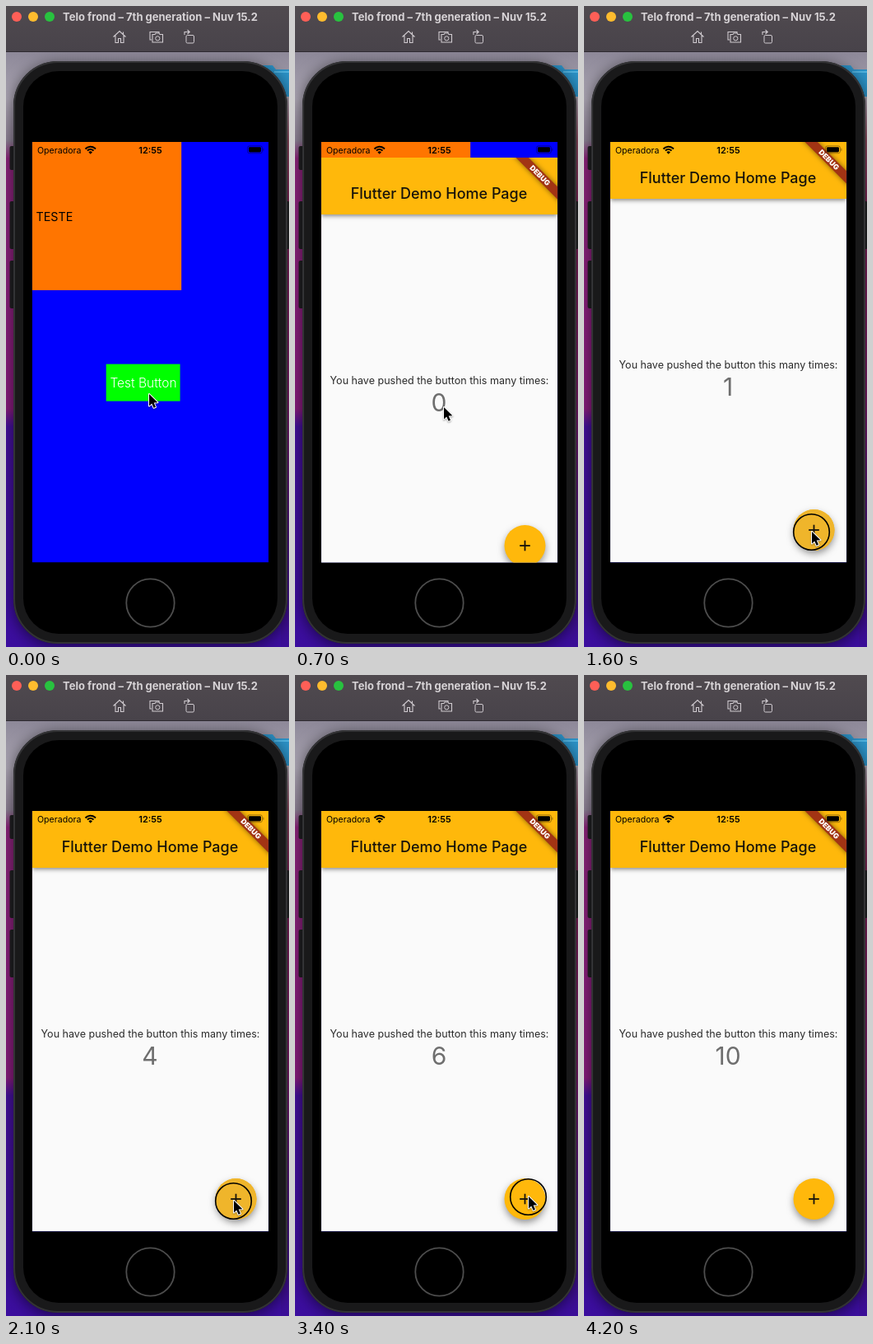
Recreate the animation shown at these times as an HTML page with a canvas. Size 344 by 778 pixels, loop 5.1 s.

```html
<!DOCTYPE html>
<html lang="en">
<head>
<meta charset="utf-8">
<title>Simulator demo</title>
<style>
html, body { margin: 0; width: 100%; height: 100%; overflow: hidden; background: #000; }
canvas { display: block; }
</style>
</head>
<body>
<canvas id="stage" width="344" height="778"></canvas>
<script>
const ctx = document.getElementById('stage').getContext('2d');
const LOOP = 5100, STEP = 100, LAST = 4200;
const SCREEN = { x: 31.7, y: 164.9, w: 287.6, h: 510.5 };
const FAB = { x: 279.5, y: 471, r: 25 };   // relative to the page top
const AMBER = '#ffb80b';
const RELEASES = [1500, 1700, 1900, 2000, 2200, 2400, 3500, 3700, 3800, 4000];
const POINTER = [
  [0, 174, 471], [300, 174, 470], [500, 170.5, 463], [700, 181, 487],
  [1300, 277, 638], [2400, 277, 638], [2700, 208, 516], [2900, 208, 516],
  [3300, 284, 633], [4000, 284, 633], [4200, 352, 560]
];

function rect(x, y, w, h, fill) {
  ctx.fillStyle = fill;
  ctx.fillRect(x, y, w, h);
}

function paint(fill, stroke, width) {
  if (fill) { ctx.fillStyle = fill; ctx.fill(); }
  if (stroke) { ctx.strokeStyle = stroke; ctx.lineWidth = width; ctx.stroke(); }
}

function round(x, y, w, h, r, fill, stroke, width = 1) {
  ctx.beginPath();
  ctx.roundRect(x, y, w, h, r);
  paint(fill, stroke, width);
}

function disc(x, y, r, fill, stroke, width = 1) {
  ctx.beginPath();
  ctx.arc(x, y, r, 0, Math.PI * 2);
  paint(fill, stroke, width);
}

function path(d, color, width = 1.1) {
  ctx.strokeStyle = color;
  ctx.lineWidth = width;
  ctx.stroke(new Path2D(d));
}

function label(str, x, y, size, weight, color, align = 'left') {
  ctx.font = `${weight} ${size}px Inter, sans-serif`;
  ctx.textAlign = align;
  ctx.fillStyle = color;
  ctx.fillText(str, x, y);
}

function vertical(y0, y1, ...stops) {
  const g = ctx.createLinearGradient(0, y0, 0, y1);
  for (const [at, color] of stops) g.addColorStop(at, color);
  return g;
}

function shadowed(color, blur, dy, draw) {
  ctx.save();
  ctx.shadowColor = color;
  ctx.shadowBlur = blur;
  ctx.shadowOffsetY = dy;
  draw();
  ctx.restore();
}

function clipped(x, y, w, h, draw) {
  ctx.save();
  ctx.beginPath();
  ctx.rect(x, y, w, h);
  ctx.clip();
  draw();
  ctx.restore();
}

function desktop() {
  rect(0, 55, 344, 723, vertical(55, 778,
    [0, '#8d8898'], [0.08, '#aaa4b2'], [0.15, '#8c8094'], [0.18, '#8a2379'],
    [0.6, '#861b7b'], [0.63, '#43109a'], [1, '#3b0d9e']));
  rect(334, 110, 10, 668, vertical(110, 778,
    [0, '#a9a4b0'], [0.08, '#8f4a60'], [0.2, '#7c1f55'], [0.55, '#7a1a68'],
    [0.8, '#4a0f80'], [1, '#3a0d98']));
  ctx.fillStyle = '#2b91c6';
  ctx.fill(new Path2D('M312 72h12l4 5h16v33h-32z'));
  rect(326, 79, 18, 2, '#4fb2df');
}

function titleBar() {
  rect(0, 0, 344, 55, vertical(0, 55, [0, '#504a4f'], [1, '#48434a']));
  rect(0, 55, 344, 1, '#2e2a31');
  ['#ff5f57', '#febc2e', '#28c23f'].forEach((c, i) => disc(13 + i * 20, 13, 6, c));
  label('Telo frond – 7th generation – Nuv 15.2', 69, 17.5, 13, 700, '#d7d3d6');
  const c = '#d0cbd0';
  path('M130.5 37.5L138 30.5L145.5 37.5M133 36v8.5h3.5v-5h3v5h3.5v-8.5M142.5 34.5v-3', c);
  path('M177 41h-2v-9.5h11v2M178 34.5h3l1-1.500h4l1 1.500h3.500v9.500h-12.500z', c);
  disc(184.3, 39.3, 2.6, null, c);
  round(219, 35.5, 9.5, 9.5, 1.5, null, c);
  path('M217 35v-3.500h6M220.500 29l2.700 2.500l-2.700 2.500', c);
}

function phone() {
  for (const [y, h] of [[170, 29], [237, 58], [309, 58]]) round(4.5, y, 6, h, 2, '#201f22');
  round(340, 237, 4, 58, 1, '#201f22');
  clipped(0, 56, 344, 722, () =>
    shadowed('rgba(0,0,0,.55)', 18, 3, () => round(9, 67, 333, 707, 54, '#19191a')));
  round(10, 68, 331, 705, 53, null, '#333335', 2);
  round(21, 79, 309, 683, 43, '#000');
  disc(175.5, 724.5, 29.2, null, '#4d4d4d', 1.8);
}

function nativeView() {
  rect(SCREEN.x, SCREEN.y, SCREEN.w, SCREEN.h, '#0000ff');
  rect(SCREEN.x, SCREEN.y, 181.5, 180, '#ff7500');
  label('TESTE', 36.5, 260.5, 14.3, 400, '#000');
  rect(121.7, 434.6, 89.9, 45, '#00ff00');
  label('Test Button', 167, 463, 15.5, 300, '#fff', 'center');
}

function debugBanner(top) {
  ctx.save();
  ctx.translate(SCREEN.x + SCREEN.w, top);
  ctx.rotate(Math.PI / 4);
  shadowed('rgba(0,0,0,.5)', 6, 0, () => rect(-40, 25.1, 80, 10.8, '#a23414'));
  label('DEBUG', 0, 33.6, 8.8, 900, '#fff', 'center');
  ctx.restore();
}

function flutterPage(top, count, tint) {
  rect(SCREEN.x, top, SCREEN.w, SCREEN.h, '#fafafa');
  shadowed('rgba(0,0,0,.45)', 5, 2, () => rect(SCREEN.x, top, SCREEN.w, 69, AMBER));
  label('Flutter Demo Home Page', 175, top + 50, 18, 500, '#17130a', 'center');
  label('You have pushed the button this many times:', 175.5, top + 275, 12.55, 400, '#2b2b2b', 'center');
  label(count, 175, top + 307.5, 30, 400, '#6e6e6e', 'center');

  const y = top + FAB.y;
  shadowed('rgba(0,0,0,.4)', 8, 4, () => disc(FAB.x, y, FAB.r, AMBER));
  if (tint) disc(FAB.x, y, FAB.r, '#efb52b');
  rect(FAB.x - 6.3, y - 0.9, 12.6, 1.8, '#17130a');
  rect(FAB.x - 0.9, y - 6.3, 1.8, 12.6, '#17130a');
  debugBanner(top);
}

function statusBar() {
  label('Operadora', 38, 178.7, 10.6, 400, '#000');
  label('12:55', 175.5, 178.8, 11, 600, '#000', 'center');
  ctx.strokeStyle = '#000';
  ctx.lineWidth = 2;
  for (const r of [5, 8.3]) {
    ctx.beginPath();
    ctx.arc(102.7, 179, r, -Math.PI * 0.77, -Math.PI * 0.23);
    ctx.stroke();
  }
  ctx.beginPath();
  ctx.moveTo(102.7, 179.7);
  ctx.arc(102.7, 179.7, 3.2, -Math.PI * 0.75, -Math.PI * 0.25);
  ctx.fillStyle = '#000';
  ctx.fill();
  round(293.5, 169.8, 18, 9, 2.5, null, 'rgba(0,0,0,.4)', 0.9);
  round(295, 171.2, 15, 6.2, 1.4, '#000');
  rect(312.4, 172.8, 1, 3, 'rgba(0,0,0,.4)');
}

function pointerAt(t) {
  const i = Math.max(1, POINTER.findIndex(k => k[0] >= t));
  const [t0, x0, y0] = POINTER[i - 1], [t1, x1, y1] = POINTER[i];
  const u = (t - t0) / (t1 - t0), e = u * u * (3 - 2 * u);
  return [x0 + (x1 - x0) * e, y0 + (y1 - y0) * e];
}

function pointer(t, pressed) {
  const [x, y] = pointerAt(t);
  if (pressed) disc(x - 0.5, y + 0.5, 21.8, null, '#000', 1.6);
  const arrow = new Path2D('M0 0V14.500L3.300 11.500L5.600 16.800L8 15.800L5.700 10.600L10.400 10.300Z');
  ctx.save();
  ctx.translate(x, y);
  ctx.lineJoin = 'round';
  ctx.lineWidth = 2;
  ctx.strokeStyle = '#fff';
  shadowed('rgba(0,0,0,.35)', 2, 1, () => ctx.stroke(arrow));
  ctx.fillStyle = '#000';
  ctx.fill(arrow);
  ctx.restore();
}

// Critically damped spring, as used for a modal sheet.
const SHEET_START = 430;
function sheetTop(t) {
  const s = (t - SHEET_START) * 0.0189;
  return Math.round(SCREEN.y + SCREEN.h * (1 + s) * Math.exp(-s));
}

function draw(t) {
  const count = RELEASES.filter(r => r <= t).length;
  const pressed = t === 300 || RELEASES.includes(t + STEP);
  const tint = (t >= 1500 && t <= 2400) || (t >= 3500 && t <= 4000);
  desktop();
  titleBar();
  phone();
  clipped(SCREEN.x, SCREEN.y, SCREEN.w, SCREEN.h, () => {
    nativeView();
    if (t > SHEET_START) {
      const top = sheetTop(t);
      clipped(SCREEN.x, top, SCREEN.w, SCREEN.h, () => flutterPage(top, String(count), tint));
    }
    statusBar();
  });
  if (t < LAST) pointer(t, pressed);
}

const start = performance.now();
function tick() {
  const t = (performance.now() - start) % LOOP;
  draw(Math.min(LAST, Math.floor(t / STEP) * STEP));
  requestAnimationFrame(tick);
}
tick();
</script>
</body>
</html>
```
